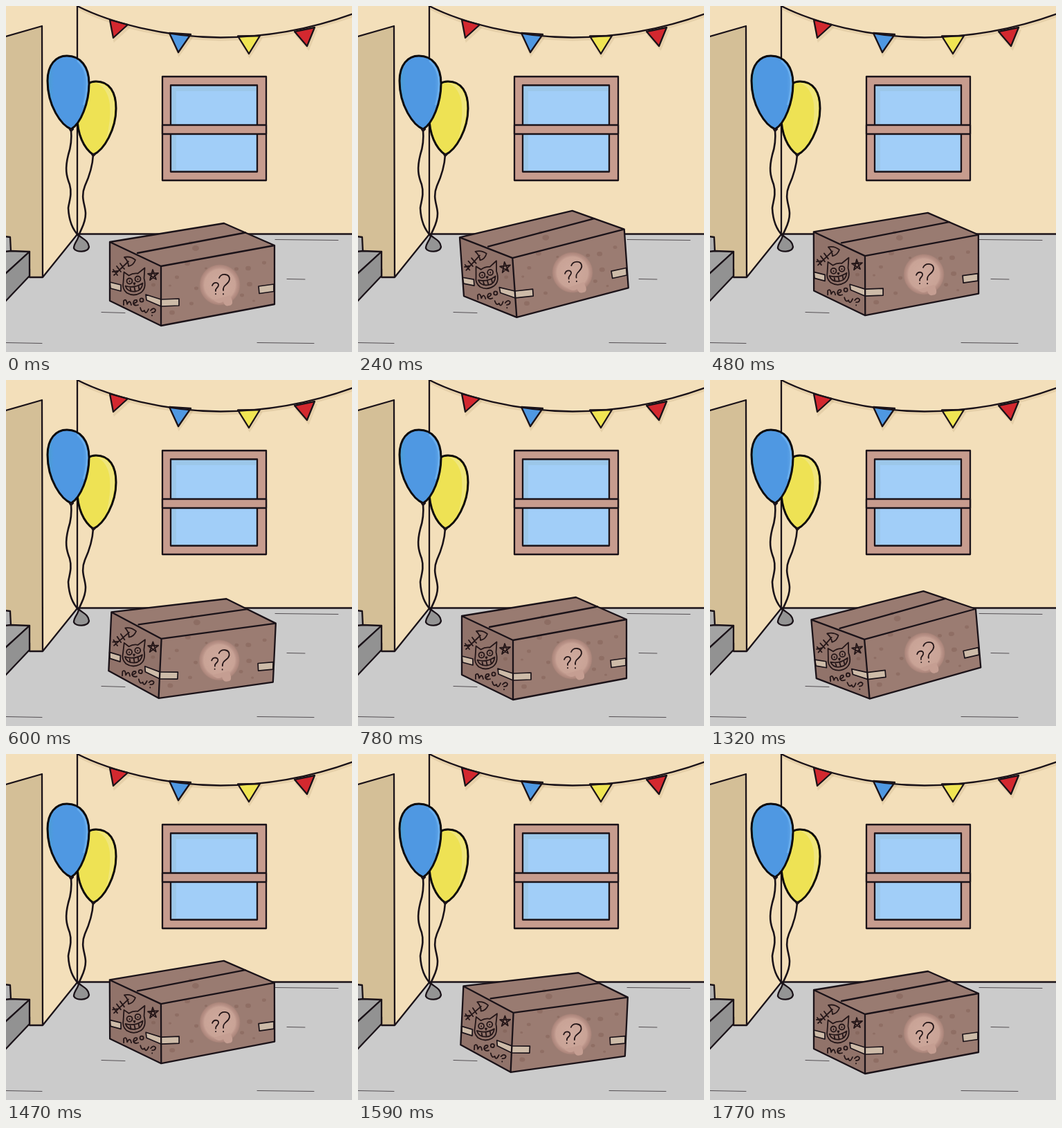
An HTML page for the animation above (1.95 s loop, 500 by 500 pixels).

```html
<!DOCTYPE html>
<html lang="en">
<head>
<meta charset="utf-8">
<title>Hopping box</title>
<style>
  html, body { margin: 0; width: 100%; height: 100%; overflow: hidden; background: #f3dfba; }
  svg { display: block; width: 100%; height: 100%; }
  .ink { stroke: #1a1218; stroke-width: 2.3; stroke-linejoin: round; stroke-linecap: round; }
  .line { fill: none; }
  .thick { stroke: #0c0a0c; stroke-width: 3; }
  .string { stroke-width: 2.6; }
  .thin { stroke-width: .8; stroke-opacity: .85; }
  .doodle { fill: none; stroke: #241618; stroke-width: 1.8; stroke-linecap: round; stroke-linejoin: round; }
  .shade { fill: none; stroke: #8a6a3a; stroke-opacity: .13; stroke-width: 4; }
  .stain { fill: #6f4a42; fill-opacity: .28; }
  .tape { fill: #cdbba8; stroke-width: 1.7; }
</style>
</head>
<body>
<svg viewBox="0 0 500 500" preserveAspectRatio="none">
  <defs>
    <radialGradient id="glow">
      <stop offset="0" stop-color="#cfaa9e"/>
      <stop offset=".74" stop-color="#c9a396"/>
      <stop offset=".82" stop-color="#bb9489"/>
      <stop offset=".94" stop-color="#b28a7f" stop-opacity=".8"/>
      <stop offset="1" stop-color="#a98277" stop-opacity="0"/>
    </radialGradient>
    <linearGradient id="blue">
      <stop offset="0" stop-color="#4a9fd2"/>
      <stop offset=".15" stop-color="#4f98e2"/>
      <stop offset=".85" stop-color="#4f98e2"/>
      <stop offset="1" stop-color="#62a8ea"/>
    </linearGradient>
  </defs>

  <g id="room">
    <path fill="#cbcbcb" d="M103 329H500V500H0V400L34 392H53Z"/>
    <path fill="#d4bf97" d="M0 44L52 29L53 392H34V370H0Z"/>
    <path class="ink line" d="M0 44L52 29L53 392H34V380M53 392L103 330M103 0V329.500H500"/>
    <g class="ink">
      <path fill="#b0b0b0" d="M-2 333L6 334L7 354L-2 362Z"/>
      <path fill="#a3a3a3" d="M-2 355L7 354L34 355L-2 388Z"/>
      <path fill="#929292" d="M34 355V390L-2 428V388Z"/>
    </g>
    <path class="ink thin line" d="M389 337.500L480 338.500M406 394.500L432 395M138 442.500L172 443.500M0 486.500L52 487.500M363 486.500L445 487.500"/>
  </g>

  <g id="window">
    <path class="ink" fill="#c79c8e" d="M226 102H376V252H226Z"/>
    <path class="ink" fill="#9cc7e9" d="M238 114.500H363V239.500H238Z"/>
    <path fill="#a1cef8" d="M246 123H361V172H246ZM246 185H361V237H246Z"/>
    <path class="ink" fill="#c79c8e" d="M226 172H376V185H226Z"/>
  </g>

  <g id="bunting">
    <path class="shade" d="M104 3C150 27 230 48 310 48.500C385 48 450 33 502 14"/>
    <path class="shade" d="M152 22L157 49L178 30M238 42L250 70L269 44M337 46L352 72L369 46M419 41L437 61L448 34"/>
    <g class="ink">
      <path fill="#d3282f" d="M150 20L176 27L155 46Z"/>
      <path fill="#4f98e2" d="M236 39L267 41L249 67Z"/>
      <path fill="#f0e553" d="M335 43.500L367 43L351 69Z"/>
      <path fill="#d3282f" d="M417 37L446 31L435 58Z"/>
    </g>
    <path class="ink line" d="M103 0C150 24 230 45 310 45.500C385 45 450 30 502 11"/>
  </g>

  <g id="balloons">
    <path class="ink line string" d="M126 215C125 232 120 247 114 260C107 277 115 288 115 300C115 315 108 322 105 332"/>
    <path class="ink line string" d="M94 179C95 190 94 203 90 215C85 235 87 245 92 258C96 272 91 283 90 292C91 312 98 325 105 332"/>
    <path class="ink thick" fill="#eee254" d="M126 215C112 205 103 185 103 160C103 128 112 109 130 109C150 109 159 125 159 148C159 178 142 208 126 215Z"/>
    <path fill="#f0e67c" d="M130 111Q157 113 157 148Q156 172 145 192Q152 165 150 142Q147 118 130 111Z"/>
    <path class="ink thick" fill="url(#blue)" d="M94 178C80 172 60 145 60 108C60 85 72 72 88 72C108 72 120 88 120 112C120 140 108 170 94 178Z"/>
    <path fill="none" stroke="#6aaeed" stroke-width="2.500" d="M103 79Q117 91 117 113Q116 130 112 143"/>
    <path class="ink" d="M92 178L97 178L94 181ZM124 214L129 214L126 217Z"/>
    <path class="ink" fill="#949494" d="M105 331C109 336 119 338 120 348C119 356 101 357 98 350C98 342 105 338 105 331Z"/>
  </g>

  <g id="box">
    <path fill="#997b71" d="M150 341L315 314L388 346L224 376Z"/>
    <path fill="#91736a" d="M150 341L224 376V462L150 426Z"/>
    <path fill="#9b7c72" d="M224 376L388 346V431L224 462Z"/>
    <g id="stains" class="stain"></g>
    <circle cx="309" cy="403" r="30" fill="url(#glow)"/>
    <path fill="#c59e92" d="M300 425Q308 432 314 427Q316 435 322 433Q328 433 327 426L324 418Z"/>
    <path class="ink line" d="M190 357L346 327.500"/>
    <g class="ink">
      <path class="tape" d="M150 399L166 403V412L151 408Z"/>
      <path class="tape" d="M202 417L224 424L250 423V433L224 434L203 425Z"/>
      <path class="tape" d="M365 405L387 402V412.500L366 415.500Z"/>
    </g>
    <path class="ink line" d="M150 341L315 314L388 346V431L224 462L150 426ZM150 341L224 376L388 346M224 376V462"/>

    <g class="doodle" role="img" aria-label="??">
      <path d="M308 393C311 386 323 386 323 395C322 403 313 402 314 411M314 416v.5"/>
      <path d="M298 404C300 398 308 399 307 404C306 408 302 408 303 412M303 416v.3"/>
    </g>
    <g class="doodle" role="img" aria-label="cat" transform="translate(-1.500 1.500)">
      <path d="M171 398L172 383L179 388Q185 384 192 385L202 377L201 392Q205 407 196 413Q186 419 176 413Q169 407 171 398Z"/>
      <circle cx="180" cy="396" r="4"/>
      <circle cx="192" cy="393" r="4"/>
      <path d="M180 396v.6M192 393v.6M186 399l2 0l-1 2z"/>
      <path d="M174 403Q187 407 199 399Q198 410 188 411Q177 412 174 403ZM181 406l1 4M187 405l1 5M193 403l1 5"/>
    </g>
    <g class="doodle">
      <path d="M156 389L177 369M155 381L161 389M160 376L166 384M165 372L171 380M154 384L161 383M171 363Q180 361 187 367Q184 375 177 376Q177 369 171 363Z"/>
      <path d="M208 396L212 381L217 395L205 387L220 386Z"/>
    </g>
    <g class="doodle" role="img" aria-label="meow?">
      <path d="M170 432V426Q174 422 175 431Q179 423 181 432M184 430Q191 428 189 425Q184 424 184 430Q186 434 191 432"/>
      <circle cx="196" cy="425" r="2.600"/>
      <path d="M194 436Q196 444 200 440Q202 447 206 438M209 440Q213 435 216 439Q216 443 211 443M211 447v.4"/>
    </g>
  </g>
</svg>

<script>
  const LOOP = 1950, REPEAT = 990, STEP = 30;
  const box = document.getElementById('box');

  // x, y, radius
  const stains = [
    [274, 350, 5], [267, 342, 3], [333, 380, 3], [350, 379, 4], [352, 402, 4],
    [341, 418, 3], [262, 372, 4], [247, 392, 3], [268, 430, 3], [240, 443, 4],
    [275, 408, 3], [373, 371, 3], [358, 426, 2], [237, 404, 2], [213, 403, 3], [289, 379, 2]
  ];
  document.getElementById('stains').innerHTML = stains.map(([x, y, r]) =>
    `<ellipse cx="${x}" cy="${y}" rx="${r}" ry="${r * .8}"/>`).join('');

  // lift and tilt run from their first to their second value
  const hops = [
    { start: 120, time: 240, peak: 17, lift: [0, 4], tilt: [0, -5] },
    { start: 420, time: 180, peak: 15, lift: [4, 0], tilt: [-5, 2.7] },
    { start: 630, time: 150, peak: 4, lift: [0, 0], tilt: [2.7, 0] }
  ];
  const RISE = 1 / 3;
  const mix = (a, b, u) => a + (b - a) * u;
  const smooth = u => (1 - Math.cos(Math.PI * u)) / 2;
  const easeOut = u => 1 - (1 - u) ** 2.4;

  function pose(t) {
    const hop = hops.filter(h => h.start <= t).pop();
    if (!hop) return { lift: 0, tilt: 0 };
    const u = Math.min(1, (t - hop.start) / hop.time);
    const lift = u < RISE
      ? mix(hop.lift[0], hop.peak, smooth(u / RISE))
      : mix(hop.peak, hop.lift[1], smooth((u - RISE) / (1 - RISE)));
    return { lift, tilt: mix(...hop.tilt, easeOut(u)) };
  }

  const begin = performance.now();
  function draw() {
    const now = Math.max(0, performance.now() - begin) % LOOP;
    const t = Math.floor(now / STEP) * STEP % REPEAT;
    const { lift, tilt } = pose(t);
    box.setAttribute('transform', `translate(0 ${-lift}) rotate(${tilt} 269 388)`);
    requestAnimationFrame(draw);
  }
  draw();
</script>
</body>
</html>
```
